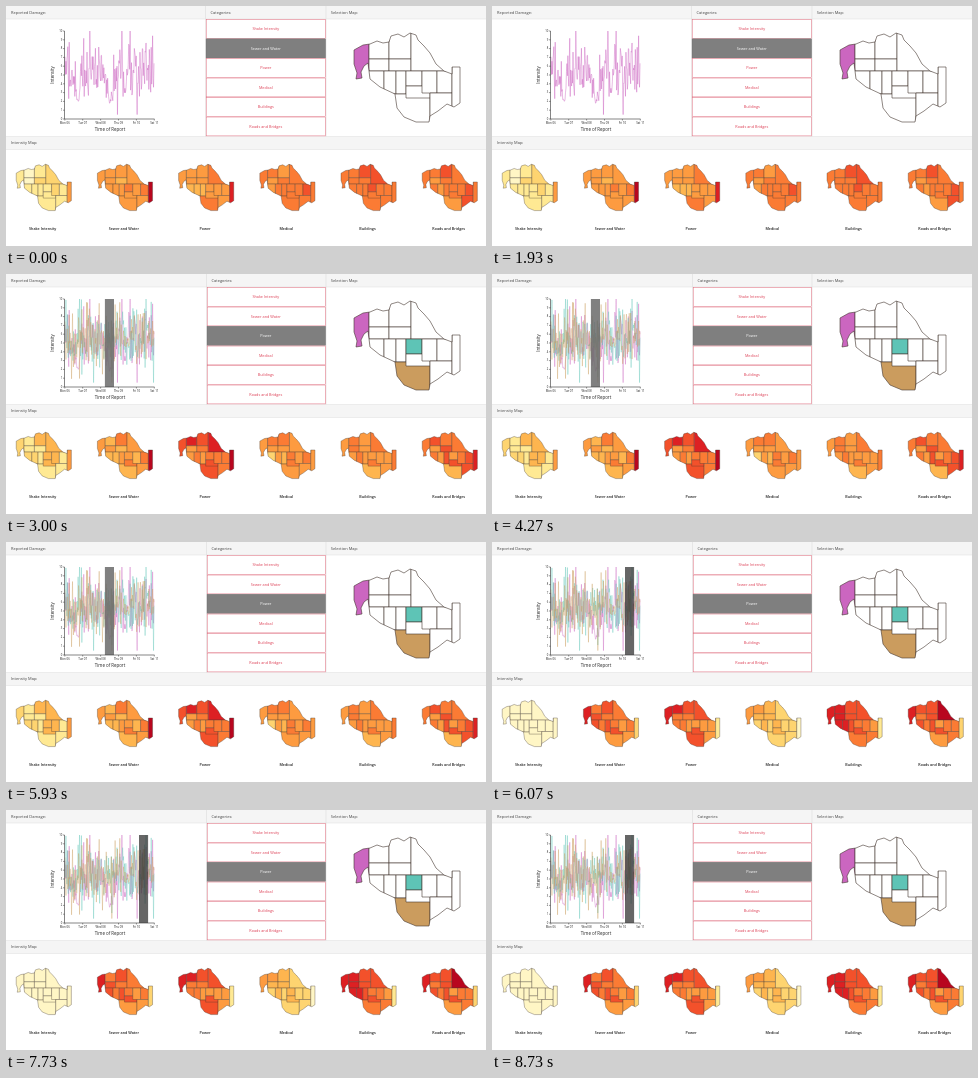
Write an HTML page with a canvas that moves like this. It is 480x240 px and loops after 8990 ms.

```html
<!DOCTYPE html>
<html lang="en">
<head>
<meta charset="utf-8">
<title>Damage dashboard</title>
<style>
html, body { margin: 0; width: 100%; height: 100%; overflow: hidden; background: #fff; }
canvas { display: block; width: 480px; height: 240px; }
</style>
</head>
<body>
<canvas id="stage"></canvas>
<script>
const LOOP = 8990, HOLD = 3000;
const FONT = '"Open Sans", "Noto Sans", sans-serif';
const canvas = document.getElementById('stage');
const ctx = canvas.getContext('2d');
const dpr = window.devicePixelRatio || 1;
canvas.width = 480 * dpr;
canvas.height = 240 * dpr;

const CATEGORIES = ['Shake Intensity', 'Sewer and Water', 'Power', 'Medical', 'Buildings', 'Roads and Bridges'];
const DAYS = ['Mon 06', 'Tue 07', 'Wed 08', 'Thu 09', 'Fri 10', 'Sat 11'];
const PURPLE = '#cb66c0', TEAL = '#5ec4b6', TAN = '#cb9c5e';
const HEAT = ['#fff6c5', '#ffe993', '#fed470', '#feb54f', '#fd9b40', '#fb7b34', '#f3512b', '#dd2023', '#b8061f'];

const COAST = new Path2D('M348,44 357,39 364,38 371,35 377,37 383,36 385,30 392,28 398,31 404,27 ' +
  '410,29 412,34 418,40 424,47 430,58 438,65 446,68 446,61 454,61 454,97 448,101 441,98 432,105 ' +
  '424,110 423,116 410,116 398,111 391,102 389,88 374,81 364,73 362,57 358,60 355,66 356,72 ' +
  '350,73 351,67 348,58Z');

// Street blocks: column edges and row edges; the coast trims the cells.
const DISTRICTS = [
  [[340, 363], [30, 80]],
  [[363, 383, 405], [26, 53, 65]],
  [[405, 446], [26, 65]],
  [[360, 378, 390, 400], [65, 88]],
  [[385, 424], [88, 120]],
  [[400, 416], [65, 80]],
  [[400, 424], [80, 92]],
  [[416, 431, 446], [65, 87]],
  [[424, 446], [87, 115]],
  [[446, 456], [58, 104]]
].flatMap(([xs, ys]) =>
  ys.slice(1).flatMap((y1, r) =>
    xs.slice(1).map((x1, c) => ({ x: xs[c], y: ys[r], w: x1 - xs[c], h: y1 - ys[r] }))));
const WEST = 0, NORTH_EAST = 5, SOUTH = 9, CENTRE = 10, SHORE = DISTRICTS.length - 1;

// base and shore: mean heat of the land and of the eastern strip, per category.
const picks = { [WEST]: PURPLE, [CENTRE]: TEAL, [SOUTH]: TAN };
const STATES = [
  { active: 1, left: 199.5, picks: { [WEST]: PURPLE },
    base: [1, 4, 4, 5, 5, 5], shore: [4, 8, 7, 5, 5, 5], east: 0.6, north: 0.2, spread: 1.3 },
  { active: 2, left: 200.5, picks, brush: 98.9, shade: 'rgba(108,108,108,.86)',
    base: [1.8, 4, 5.6, 4, 4, 5], shore: [4, 8, 8, 4, 5, 7], east: 0.8, north: 0.8, spread: 2.4 },
  { active: 2, left: 200.5, picks, brush: 133, shade: 'rgba(55,55,55,.76)', hottest: 5,
    base: [-2, 5.5, 5.3, 2.6, 5.6, 5.4], shore: [0, 2, 1, 0, 1, 2], east: -0.6, north: 0.6, spread: 2 }
];

function rng(seed) {
  let s = seed * 2654435761 >>> 0;
  return () => {
    s = (Math.imul(s, 1664525) + 1013904223) >>> 0;
    return s / 4294967296;
  };
}

function label(str, x, y, size, color, align = 'left', weight = 400) {
  ctx.font = `${weight} ${size}px ${FONT}`;
  ctx.fillStyle = color;
  ctx.textAlign = align;
  ctx.textBaseline = 'middle';
  ctx.fillText(str, x, y);
}

function box(x, y, w, h, color) {
  ctx.fillStyle = color;
  ctx.fillRect(x, y, w, h);
}

function line(x1, y1, x2, y2, color, width = 0.6) {
  ctx.beginPath();
  ctx.moveTo(x1, y1);
  ctx.lineTo(x2, y2);
  ctx.strokeStyle = color;
  ctx.lineWidth = width;
  ctx.stroke();
}

function drawMap(x, y, scale, width, fills) {
  ctx.save();
  ctx.translate(x, y);
  ctx.scale(scale, scale);
  ctx.translate(-347, -27);
  ctx.lineWidth = width / scale;
  ctx.lineJoin = 'round';
  ctx.strokeStyle = '#44372f';
  ctx.save();
  ctx.clip(COAST);
  DISTRICTS.forEach((d, i) => {
    box(d.x, d.y, d.w, d.h, fills[i]);
    ctx.strokeRect(d.x, d.y, d.w, d.h);
  });
  ctx.restore();
  ctx.stroke(COAST);
  ctx.restore();
}

function heatFills(state, map) {
  const rand = rng(map + 3 + state.active * 10);
  return DISTRICTS.map((d, i) => {
    const u = (d.x + d.w / 2 - 400) / 50;
    const v = (72 - d.y - d.h / 2) / 45;
    let heat = state.base[map] + state.east * u + state.north * v + state.spread * (rand() - 0.5);
    if (i === SHORE) heat = state.shore[map];
    if (i === NORTH_EAST && map === state.hottest) heat = 8;
    return HEAT[Math.max(0, Math.min(8, Math.round(heat)))];
  });
}

function drawSeries(seed, color, dips, alpha) {
  const rand = rng(seed);
  const n = 190;
  ctx.beginPath();
  for (let i = 0; i <= n; i++) {
    const x = 59 + 89 * i / n;
    let value = 5.6 + (rand() + rand() - 1) * 3.4;
    if (rand() < 0.2) value += (rand() - 0.45) * 9;
    for (const [at, depth, spread] of dips) {
      const pull = Math.exp(-(((x - at) / spread) ** 2));
      value += (depth - value) * pull * 0.9;
    }
    ctx.lineTo(x, 113 - 8.8 * Math.max(0.5, Math.min(10, value)));
  }
  ctx.strokeStyle = color;
  ctx.globalAlpha = alpha;
  ctx.lineWidth = 0.45;
  ctx.stroke();
  ctx.globalAlpha = 1;
}

function drawChart(state) {
  const many = state.brush !== undefined;
  drawSeries(71, PURPLE, [[72, 1.5, 3], [104, 1.6, 3], [119, 3, 1.5]], many ? 0.85 : 1);
  if (many) {
    drawSeries(212, TEAL, [[69, 3.5, 1.5]], 0.8);
    drawSeries(935, TAN, [[121, 5, 3]], 0.8);
    box(state.brush, 25, 9.1, 88, state.shade);
  }
  line(58.5, 25, 58.5, 113, '#333');
  line(58.5, 113, 148.5, 113, '#333');
  for (let v = 0; v <= 10; v++) {
    const y = 113 - v * 8.8;
    line(57, y, 58.5, y, '#333', 0.5);
    label(v, 56.3, y, 2.7, '#222', 'right');
  }
  DAYS.forEach((day, i) => {
    const x = 58.8 + i * 17.9;
    line(x, 113, x, 114.5, '#333', 0.5);
    label(day, x, 116.9, 2.9, '#222', 'center');
  });
  label('Time of Report', 104, 123.4, 4.4, '#222', 'center');
  ctx.save();
  ctx.translate(46.6, 69);
  ctx.rotate(-Math.PI / 2);
  label('Intensity', 0, 0, 4.4, '#222', 'center');
  ctx.restore();
}

function drawPanels(left) {
  box(0, 0, 480, 13, '#f5f5f5');
  box(0, 130.5, 480, 13, '#f5f5f5');
  [13, 130.5, 143.5].forEach(y => line(0, y, 480, y, '#e2e2e2'));
  [left, 320].forEach(x => line(x, 0, x, 130.5, '#dcdcdc'));
  label('Reported Damage:', 5, 7, 4, '#444');
  label('Categories:', left + 5, 7, 4, '#444');
  label('Selection Map:', 324.7, 7, 4, '#444');
  label('Intensity Map:', 5, 137.2, 4, '#444');
}

function drawButtons(state) {
  const x = state.left + 0.4, h = 19.5;
  CATEGORIES.forEach((name, i) => {
    const y = 13.2 + i * h, on = i === state.active;
    box(x, y, 319.6 - x, h, on ? '#7f7f7f' : '#fff');
    ctx.strokeStyle = on ? '#777' : '#dc6072';
    ctx.lineWidth = 0.5;
    ctx.strokeRect(x + 0.3, y + 0.3, 319 - x, h - 0.6);
    label(name, 259.8, y + h / 2 + 0.3, 3.8, on ? '#fff' : '#dc3d53', 'center');
  });
}

function draw(state) {
  ctx.setTransform(dpr, 0, 0, dpr, 0, 0);
  box(0, 0, 480, 240, '#fff');
  drawPanels(state.left);
  drawChart(state);
  drawButtons(state);
  drawMap(347, 27, 1, 0.6, DISTRICTS.map((d, i) => state.picks[i] || '#fff'));
  CATEGORIES.forEach((name, i) => {
    const x = i * 81.2;
    drawMap(9.7 + x, 158.3, 0.52, 0.35, heatFills(state, i));
    label(name, 36.7 + x, 222.7, 3.7, '#222', 'center', 600);
  });
}

let shown;
function tick(now) {
  const state = STATES[Math.floor(now % LOOP / HOLD)];
  if (state !== shown) draw(shown = state);
  requestAnimationFrame(tick);
}
tick(performance.now());
</script>
</body>
</html>
```
